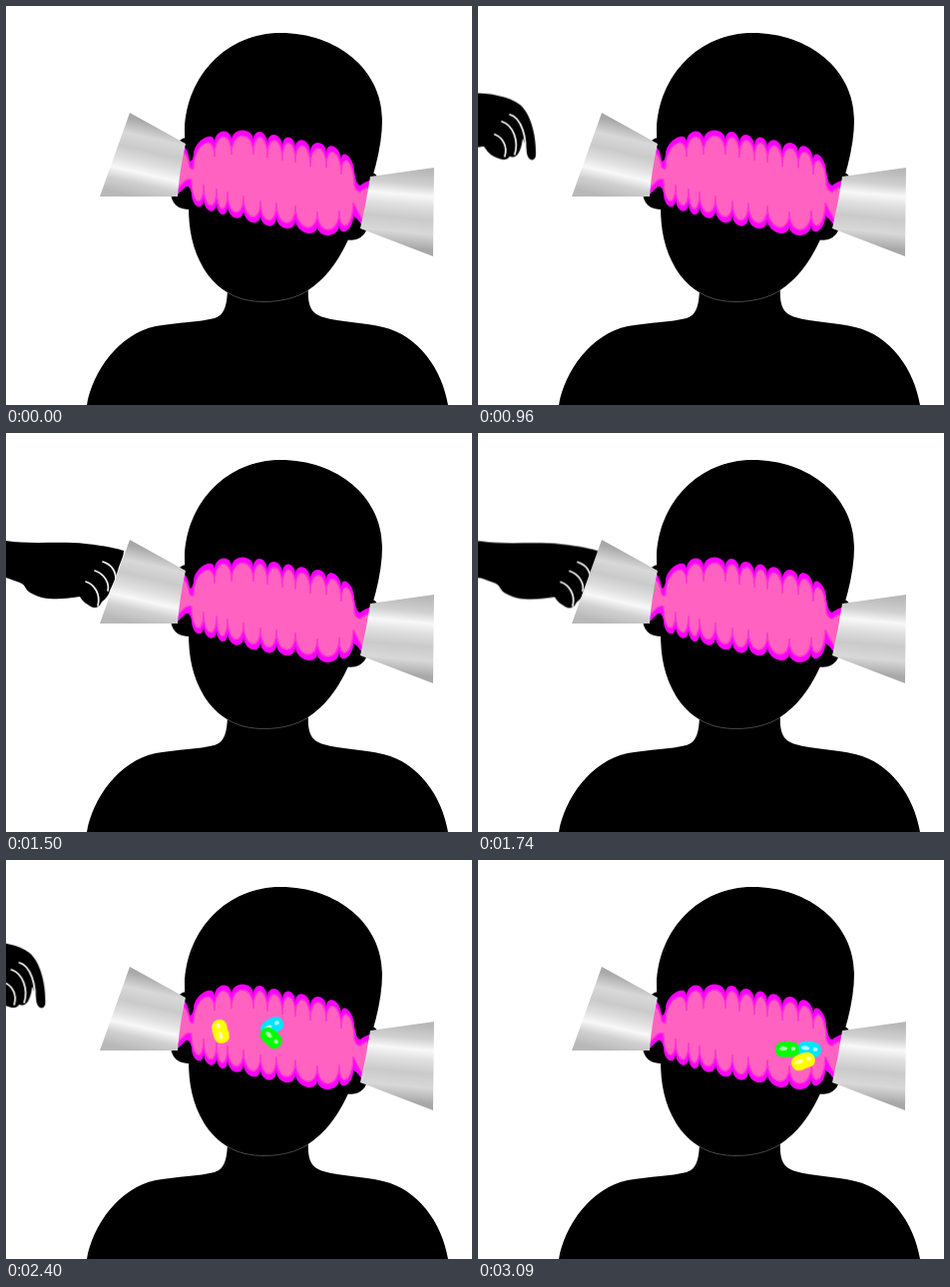
An HTML page for the animation above (3600 ms loop, 467 by 400 pixels).

```html
<!DOCTYPE html>
<html lang="en">
<head>
<meta charset="utf-8">
<title>Jelly beans</title>
<style>
  html, body { margin: 0; width: 100%; height: 100%; overflow: hidden; background: #fff; }
  svg { display: block; width: 467px; height: 400px; }
  .move, .arm, .gaps { animation: 3600ms linear infinite; }
  .arm { animation-name: arm; }
  .gaps { animation-name: gaps; fill: none; stroke: #fff; stroke-width: 1.7; stroke-linecap: round; }
  #hand { animation-name: reach; }
  #cyan { animation-name: cyan; color: #00e4ff; }
  #green { animation-name: green; color: #0f0; }
  #yellow { animation-name: yellow; color: #ff0; }

  @keyframes reach {
    0%, 13.333% { transform: translate(-91px, -28px); }
    33.333%, 41.667% { transform: translate(0, 0); }
    58.333% { transform: translate(7px, 1px); }
    73.333%, 100% { transform: translate(-93px, -28px); }
  }
  /* drooping fingers, then a flat wrist tipping into the funnel */
  @keyframes arm {
    0%, 33.333%, 62%, 100% { d: path("M-160 98 C-100 98 -40 98 0 98 C25 94 58 97 72 108 C84 118 89 142 88 160 C86 166 80 164 79 156 C78 150 77 146 75 142 C74 150 71 164 62 160 C58 166 50 162 46 160 C40 157 38 152 36 150 C30 151 20 152 14 152 C8 152 4 152 0 152 C-40 152 -100 150 -160 150 Z"); }
    41.667%, 58.333% { d: path("M-160 98 C-100 102 -40 105 0 108 C25 112 55 108 80 111 C100 113 112 116 118 118 C118 124 114 130 112 138 C110 144 108 150 104 158 C102 166 96 168 95 171 C92 177 85 175 82 172 C78 170 75 166 74 164 C60 166 40 169 26 161 C18 157 20 152 14 150 C8 148 4 146 0 145 C-40 141 -100 140 -160 140 Z"); }
  }
  @keyframes gaps {
    0%, 33.333%, 62%, 100% { d: path("M62 118 C73 121 80 140 77 160 M54 125 C66 129 71 145 67 158 M47 138 C55 141 60 150 57 160"); }
    41.667%, 58.333% { d: path("M97 129 C106 132 110 139 110 147 M89 138 C98 141 104 150 102 158 M80 149 C89 152 95 162 92 173"); }
  }
  @keyframes cyan {
    0%, 46.9% { transform: translate(140px, 150px) rotate(20deg); }
    58.333% { transform: translate(213px, 155px) rotate(0deg); }
    75% { transform: translate(320px, 179px) rotate(-58deg); }
    85.833%, 100% { transform: translate(332px, 190px) rotate(8deg); }
  }
  @keyframes green {
    0%, 45% { transform: translate(150px, 155px) rotate(120deg); }
    58.333% { transform: translate(221px, 167px) rotate(88deg); }
    75%, 100% { transform: translate(310px, 190px) rotate(2deg); }
  }
  @keyframes yellow {
    0%, 55.4% { transform: translate(150px, 158px) rotate(-130deg); }
    75% { transform: translate(263px, 182px) rotate(-82deg); }
    85.833%, 100% { transform: translate(326px, 202px) rotate(-18deg); }
  }
</style>
</head>
<body>
<svg viewBox="0 0 467 400">
  <defs>
    <linearGradient id="metal">
      <stop offset="0" stop-color="#a8a8a8"/>
      <stop offset=".2" stop-color="#d8d8d8"/>
      <stop offset=".38" stop-color="#cacaca"/>
      <stop offset=".55" stop-color="#e0e0e0"/>
      <stop offset=".68" stop-color="#f8f8f8"/>
      <stop offset=".82" stop-color="#d0d0d0"/>
      <stop offset="1" stop-color="#b8b8b8"/>
    </linearGradient>
    <linearGradient id="metalL" href="#metal" gradientUnits="userSpaceOnUse" x1="150" y1="118" x2="133" y2="192"/>
    <linearGradient id="metalR" href="#metal" gradientUnits="userSpaceOnUse" x1="397" y1="242" x2="404" y2="164"/>
    <g id="bean">
      <path d="M-12 0 C-12 -6 -7 -8 -1 -8 C7 -9 12 -6 12 0 C12 6 7 8 2 7.2 C-1 7 -2 8 -6 7.5 C-10 7 -12 4 -12 0 Z" fill="currentColor"/>
      <g fill="#fff" opacity=".7">
        <ellipse cx="-4" cy="-1" rx="4" ry="2"/>
        <ellipse cx="6" cy="-1" rx="2.5" ry="2"/>
      </g>
    </g>
  </defs>

  <path d="M182 132 C168 132 165 150 165 185 C165 200 174 205 188 204 Z"/>
  <path d="M366 167 C376 168 372 180 372 190 L362 222 C359 234 348 237 335 233 L350 180 Z"/>
  <path d="M81 400 C87 366 113 329 150 321 C173 317 193 317 209 313 C219 310 222 300 222 280 H303 C302 300 305 308 318 312 C335 317 357 317 378 322 C413 330 437 364 443 400 Z"/>
  <path d="M275 27 C332 27 377 64 377 114 C377 142 368 176 352 212 C341 242 328 268 304 284 C292 293 276 297 258 297 C234 297 211 285 198 263 C187 244 183 225 183 200 C181 175 179 150 179 124 C181 69 222 27 275 27 Z"/>
  <path d="M222 287 C240 300 280 300 303 285" fill="none" stroke="#777" stroke-width=".6"/>

  <path id="outer" fill="#f0f"/>
  <path id="inner" fill="#ff62c0" stroke="#ff34d4" stroke-width="1.4"/>

  <g id="cyan" class="move"><use href="#bean"/></g>
  <g id="green" class="move"><use href="#bean"/></g>
  <g id="yellow" class="move"><use href="#bean"/></g>

  <g id="hand" class="move">
    <path class="arm"/>
    <path class="gaps"/>
  </g>

  <path d="M124 107 L180 138 Q174 164 172 191 L94 191 Z" fill="url(#metalL)"/>
  <path d="M365 171 L429 162 L428 251 L355 223 Q361 198 365 171 Z" fill="url(#metalR)"/>
</svg>
<script>
  // Valleys between the lobes, in drawing order along each edge.
  const upperEdge = [[188, 149], [209, 137], [226, 135], [248, 135], [262, 138], [277, 141],
                     [290, 143], [305, 147], [321, 148], [336, 155], [349, 166]];
  const lowerEdge = [[348, 211], [334, 219], [312, 220], [290, 214], [271, 211],
                     [255, 209], [238, 204], [222, 200], [211, 197], [198, 193], [186, 188]];

  const lobes = (valleys, height) => valleys.slice(1).map(([x, y], i) => {
    const [px, py] = valleys[i];
    return `C${px} ${py + height} ${x} ${y + height} ${x} ${y}`;
  }).join(" ");

  const shift = (valleys, dy) => valleys.map(([x, y]) => [x, y + dy]);

  function ruffle(inset, height) {
    const upper = shift(upperEdge, inset), lower = shift(lowerEdge, -inset);
    const gap = inset * 0.45;
    return `M176 ${139 + gap} Q182 ${142 + gap} 184 ${155 + gap} Q186 ${158 + gap} ${upper[0]} ` +
      lobes(upper, -height) +
      ` Q351 ${180 + gap} 355 ${180 + gap} Q359 ${176 + gap} 368 ${174 + gap} ` +
      `L358 ${222 - gap} Q352 ${212 - gap} ${lower[0]} ` +
      lobes(lower, height) +
      ` Q184 ${179 - gap} 180 ${181 - gap} L172 ${189 - gap} Z`;
  }

  document.getElementById("outer").setAttribute("d", ruffle(0, 14));
  document.getElementById("inner").setAttribute("d", ruffle(14, 25));
</script>
</body>
</html>
```
